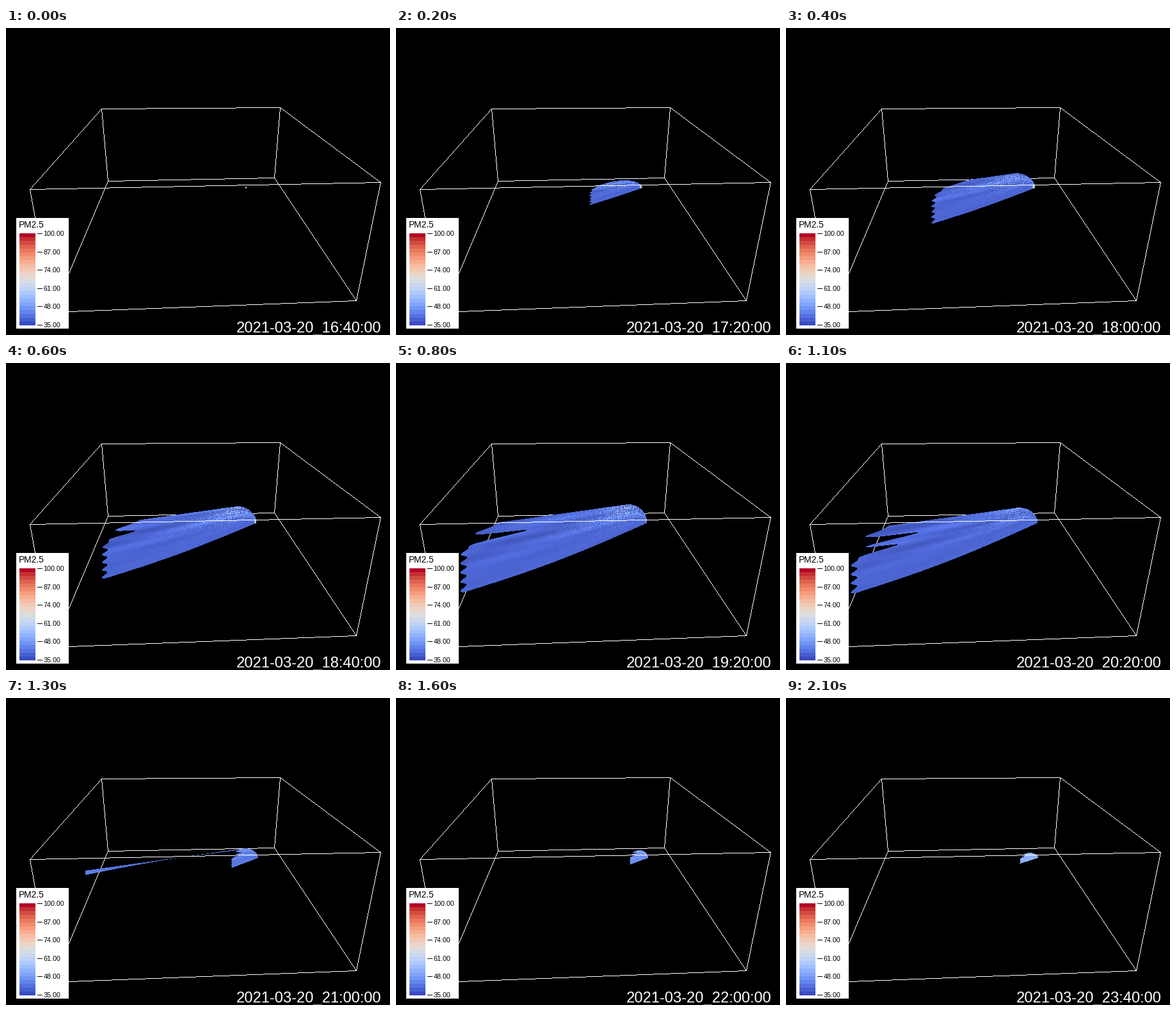
Recreate the animation shown at these times as a matplotlib script. Size 600 by 480 pixels, loop 2.2 s.

```python
import matplotlib.pyplot as plt
import numpy as np
from matplotlib.animation import FuncAnimation
from matplotlib.patches import Rectangle

W, H, DPI = 600, 480, 100
FRAMES, INTERVAL = 22, 100
PX = 72 / DPI
FONT = "Liberation Sans"
CMAP = plt.get_cmap("coolwarm")
LOW, HIGH = 35, 100
FLOOR = 250

xs, ys = np.meshgrid(np.arange(W) + 0.5, np.arange(H) + 0.5)
grain = np.random.default_rng(5).random((H, W))


def bump(x, center, width):
    return np.exp(-((x - center) / width) ** 2)


def plume_length(t):
    """Grows steadily until it leaves the room, then collapses."""
    return min(287, 3 + 39 * t) if t <= 11 else 28 + 259 * np.exp(1.5 * (11 - t))


def plume(t):
    """Mask, height share u (0 floor, 1 crest) and distance s from the vent."""
    length = plume_length(t)
    size = length / 287
    vent = 394 - 17 * np.exp(-t / 3.3)
    top = np.interp(t, [0, 4, 8, 11, 13, 21], [248, 227, 221, 226, 235, 242])
    s = vent - xs

    # Sloping foot, and a ridge that ends in a round cap at the vent
    slope = 0.385 - 0.0007 * (t - 11) ** 2
    foot = FLOOR + slope * s + 6 * size ** 2 * np.sin(np.pi * s / length)
    cap = min(30, length / 2)
    dome = np.sqrt(np.clip(1 - (1 - s / cap) ** 2, 0, 1))
    ridge = np.where(s > cap, top + 0.14 * (s - cap), FLOOR - (FLOOR - top) * dome)
    u = (foot - ys) / np.maximum(foot - ridge, 0.1)

    # Ragged far end with notches that open one after the other
    v = np.clip(u, 0, 1)
    end = length - min(60, 0.45 * length) * v ** 8
    end += 5 * size * np.sin(45 * v)
    for center, start in ((0.78, 4), (0.63, 8)):
        depth = np.clip(22 * (t - start), 0, 88) * size
        end -= depth * bump(v, center, 0.05)

    # A thin strand stays along the ridge after the collapse
    left_over = np.clip((16 - t) / 3, 0, 1) * (t > 11)
    strand = (u > 1 - 0.08 * left_over * np.abs(s - 117) / 150) & (s < 270)
    mask = (s > 0) & (u >= 0) & (u <= 1) & ((s < end) | strand)
    return mask, v, s


def surface(t, u, s):
    """Folds along the plume, bright dust by the crest, heat at the vent."""
    folds = np.sin(15 * u + s / 50 + 0.5 * t) + 0.6 * np.sin(34 * u - s / 70 - t)
    folds *= np.clip(2 * u - 0.3, 0.15, 1)
    dust = 0.3 + 0.7 * bump(t, 7, 4)
    heat = np.clip(1.7 - t / 5, 0, 1)
    value = 38.5 + 1.3 * max(t - 11, 0) + 0.8 * folds + 1.5 * grain
    value += 26 * dust * bump(s, 32, 32) * bump(u, 0.85, 0.35) * grain ** 3
    value += 8 * dust * bump(s, 60, 75) * bump(u, 0.7, 0.3) * grain ** 2
    value += 50 * heat * bump(s, 1, 2) * bump(ys, 249, 4)
    rgb = CMAP((value - LOW) / (HIGH - LOW))[..., :3]
    return np.clip(rgb * (0.98 + 0.05 * folds)[..., None], 0, 1)


def stroke(img, a, b):
    """White line, one pixel wide."""
    n = int(np.abs(np.subtract(b, a)).max()) + 1
    x, y = np.rint(np.linspace(a, b, n)).astype(int).T
    img[y, x] = 1


TOP = [(149, 126), (428, 124), (585, 241), (37, 252)]
BASE = [(159, 239), (419, 234), (547, 426), (72, 444)]

room = np.zeros((H, W, 3))
for k in range(4):
    n = (k + 1) % 4
    for a, b in ((TOP[k], TOP[n]), (BASE[k], BASE[n]), (TOP[k], BASE[k])):
        stroke(room, a, b)


def scene(t):
    img = room.copy()
    mask, u, s = plume(t)
    img[mask] = surface(t, u, s)[mask]
    stroke(img, TOP[3], TOP[2])
    return img


def stamp(t):
    hours, minutes = divmod(16 * 60 + 40 + 20 * t, 60)
    return f"2021-03-20_{hours:02d}:{minutes:02d}:00"


fig = plt.figure(figsize=(W / DPI, H / DPI), dpi=DPI, facecolor="black")
ax = fig.add_axes([0, 0, 1, 1])
ax.axis("off")


def rect(x, y, w, h, color):
    ax.add_patch(Rectangle((x, y), w, h, fc=color, lw=0, antialiased=False))


def label(x, y, s, size, color="black"):
    return ax.text(x, y, s, fontsize=size * PX, family=FONT, color=color)


def legend(bands=24, ticks=6):
    rect(16, 297, 82, 173, "white")
    label(20, 312, "PM2.5", 13.8)
    step = 144 / bands
    for k in range(bands):
        rect(21, 465 - (k + 1) * step, 25, step, CMAP(k / (bands - 1)))
    for k in range(ticks):
        y = round(464 - 28.55 * k)
        rect(49, y, 8, 1, "black")
        label(58.5, y + 4, f"{LOW + 13 * k:.2f}", 10.8)


view = ax.imshow(scene(0), extent=(0, W, H, 0), aspect="auto",
                 interpolation="nearest")
legend()
clock = label(360, 476, stamp(0), 23.75, "white")
ax.set_xlim(0, W)
ax.set_ylim(H, 0)


def update(t):
    view.set_data(scene(t))
    clock.set_text(stamp(t))
    return view, clock


anim = FuncAnimation(fig, update, frames=FRAMES, interval=INTERVAL,
                     repeat=True, repeat_delay=0)
plt.show()
```
